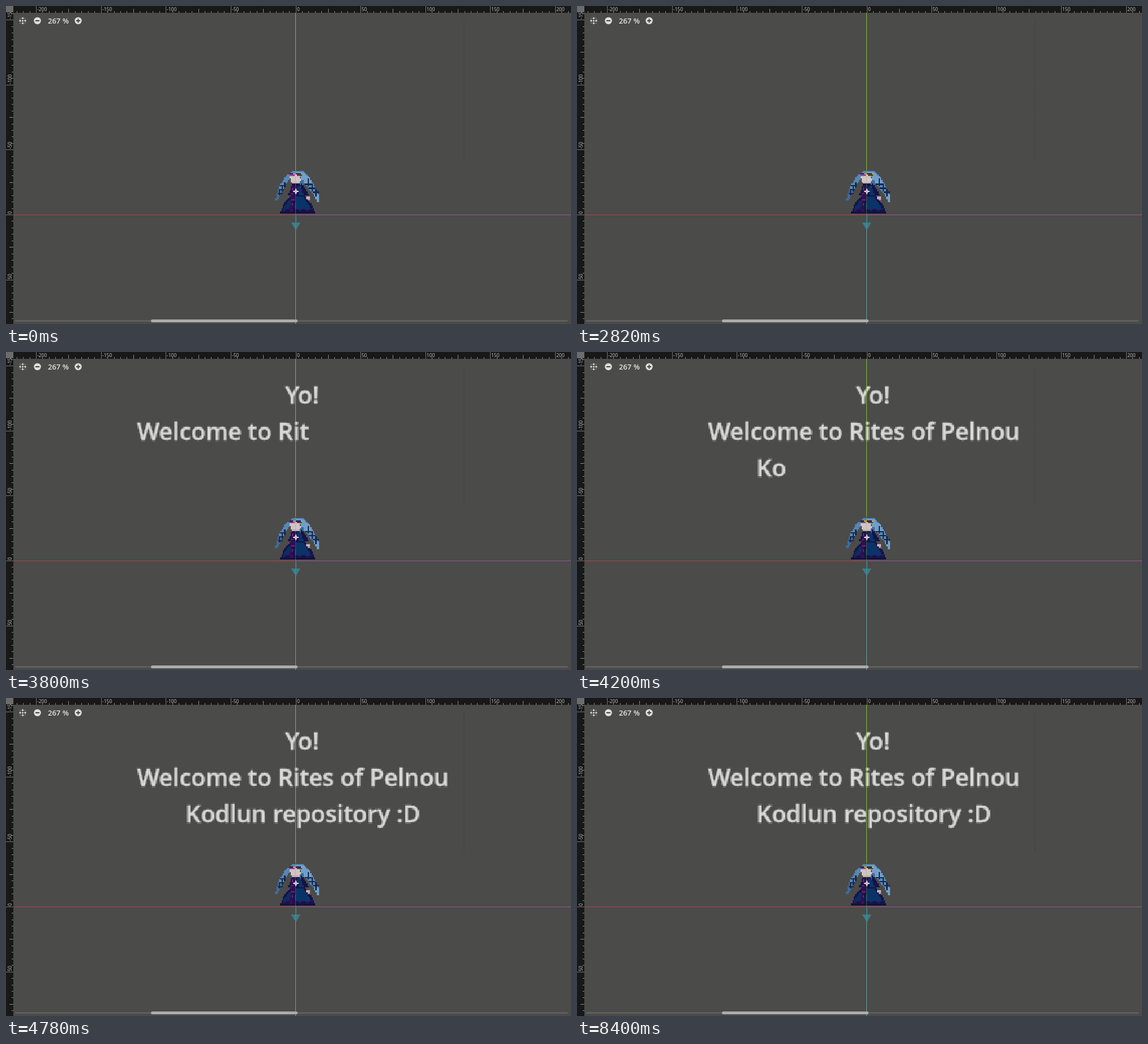
An HTML page with a canvas for the animation above (8420 ms loop, 998 by 561 pixels).

```html
<!DOCTYPE html>
<html lang="en">
<head>
<meta charset="utf-8">
<style>
  html, body { margin: 0; width: 100%; height: 100%; overflow: hidden; background: #4b4b49; }
  canvas { display: block; }
</style>
</head>
<body>
<canvas id="stage" width="998" height="561"></canvas>
<script>
const W = 998, H = 561, LOOP = 8420;
const UNIT = 2.2925, OX = 512, OY = 368.5;
const TYPE_START = 3290, TYPE_STEP = 27;
const LINES = [
  { text: 'Yo!', x: -8.3, y: -121 },
  { text: 'Welcome to Rites of Pelnou', x: -122.3, y: -93 },
  { text: 'Kodlun repository :D', x: -85, y: -65 },
];
const TYPED = LINES.reduce((sum, line) => sum + line.text.length + 1, 0);
const POSES = [
  { until: 3380, bob: 0, band: 0 },
  { until: 3780, bob: 0, band: -1 },
  { until: LOOP, bob: 1, band: 0 },
];

function layer(width, height) {
  const c = document.createElement('canvas');
  c.width = width;
  c.height = height;
  return c.getContext('2d');
}

function box(g, color, x, y, w, h) {
  g.fillStyle = color;
  g.fillRect(x, y, w, h);
}

function disc(g, color, x, y, r) {
  g.fillStyle = color;
  g.beginPath();
  g.arc(x, y, r, 0, 7);
  g.fill();
}

function poly(g, color, ...points) {
  g.fillStyle = color;
  g.beginPath();
  points.forEach(([x, y]) => g.lineTo(x, y));
  g.fill();
}

function drawBackground(g) {
  box(g, '#4b4b49', 0, 0, W, H);
  for (let y = 25; y < 270; y += 4) box(g, 'rgba(30,30,30,.25)', 808.5, y, 1, 2);
}

// Ticks every 5 units; every tenth one is labelled.
function drawRuler(g, { origin, from, to, thick, baseline, sign }) {
  g.font = "8.5px 'Open Sans', sans-serif";
  for (let n = -50; n <= 50; n++) {
    const p = Math.round(origin + n * 5 * UNIT);
    if (p < from || p > to) continue;
    const major = n % 10 === 0;
    const size = major ? thick : n % 5 === 0 ? 7 : 3;
    box(g, major ? '#777' : '#8a8a8a', p, thick - size, 1, size);
    if (major) {
      g.fillStyle = '#c8c8c8';
      g.fillText(n * 5 * sign, p + 2, baseline);
    }
  }
}

function drawRulers(g) {
  box(g, '#181818', 0, 0, W, 12);
  box(g, '#181818', 0, 0, 13, H);
  drawRuler(g, { origin: OX - 0.5, from: 13, to: W, thick: 12, baseline: 8.5, sign: 1 });
  g.save();
  g.translate(0, H);
  g.rotate(-Math.PI / 2);
  drawRuler(g, { origin: H - OY - 0.5, from: 0, to: H - 12, thick: 13, baseline: 10, sign: -1 });
  g.restore();
  box(g, '#6c6c6c', 0, 0, 13, 11);
}

function drawControls(g) {
  const pale = '#dededc', dark = '#444440';
  g.save();
  g.translate(29.5, 26);
  disc(g, pale, 0, 0, 1.5);
  for (let i = 0; i < 4; i++) {
    g.rotate(Math.PI / 2);
    poly(g, pale, [-2.5, -5], [2.5, -5], [0, -2.4]);
    box(g, pale, -0.7, -6.3, 1.4, 2);
    box(g, 'rgba(222,222,220,.6)', 3.6, 3.6, 1.3, 1.3);
  }
  g.restore();
  for (const x of [55.5, 127.5]) {
    disc(g, pale, x, 26, 6.2);
    box(g, dark, x - 3.5, 25, 7, 2);
  }
  box(g, dark, 126.5, 22.5, 2, 7);
  g.fillStyle = '#e4e4e2';
  g.font = "600 13px 'Open Sans', sans-serif";
  g.fillText('267 %', 74, 30.8);
  box(g, '#686866', 16, 554.5, 976, 2);
  g.fillStyle = '#acacaa';
  g.beginPath();
  g.roundRect(256, 553, 259, 5, 2.5);
  g.fill();
}

function drawAxes(g) {
  box(g, '#b0474a', 14, 368, OX - 14, 1);
  box(g, '#96589a', OX, 368, W - OX, 1);
  box(g, '#84b83c', 511, 12, 1, 278);
  box(g, 'rgba(132,184,60,.45)', 511, 290, 1, 78);
  box(g, '#6a9fa5', 511, 369, 1, H - 369);
  box(g, '#397f8c', 511, 369, 2, 14);
  poly(g, 'rgba(55,137,153,.8)', [503.5, 382], [520, 382], [512, 395.5]);
}

// Fills rows y0..y1 while both edges move in a straight line.
function taper(g, color, y0, y1, l0, r0, l1, r1) {
  for (let y = y0; y <= y1; y++) {
    const k = (y - y0) / Math.max(1, y1 - y0);
    const l = Math.round(l0 + (l1 - l0) * k);
    const r = Math.round(r0 + (r1 - r0) * k);
    box(g, color, l, y, r - l, 1);
  }
}

function drawHair(g) {
  const blue = '#5587b5', light = '#719fca', shade = '#3f6c9b', navy = '#15264f';
  taper(g, blue, -34, -30, -3, 6, -8, 10);
  taper(g, light, -33, -31, 0, 6, -1, 8);
  taper(g, blue, -30, -20, -8, -4, -14, -10);
  taper(g, shade, -20, -12, -14, -10, -16, -14);
  taper(g, light, -30, -25, 3, 10, 6, 13);
  taper(g, blue, -24, -17, 7, 14, 13, 17);
  taper(g, light, -16, -11, 14, 18, 16, 18);
  box(g, shade, 4, -27, 2, 4);
  for (let i = 0; i < 3; i++) {
    box(g, navy, -9 - i * 2, -25 + i * 3, 1, 4);
    box(g, navy, -12 - i, -23 + i * 3, 4, 1);
    box(g, navy, 9 + i * 3, -28 + i * 4, 1, 6);
    box(g, navy, 7 + i * 3, -24 + i * 3, 5, 1);
  }
}

function drawFace(g, band) {
  taper(g, '#d3c3c6', -31, -26, -5, 3, -4, 4);
  box(g, '#c6aeb4', -3, -25, 6, 1);
  box(g, '#28225a', -5, -32 + band, 10, 1);
  box(g, '#a23aa0', -5, -31 + band, 4, 1);
  box(g, '#b59b35', -2, -32 + band, 2, 1);
  box(g, '#594c28', 1, -31 + band, 4, 1);
  box(g, '#c9ad42', 4, -32 + band, 1, 1);
  box(g, '#207c76', 3, -26, 1, 3);
}

function drawDress(g, bob) {
  const navy = '#131349', blue = '#0a3468', plum = '#2f0f4e', magenta = '#84198a';
  taper(g, navy, -24, -16, -3, 5, -6, 10);
  taper(g, navy, -15, -10, -4, 7, -9, 11);
  taper(g, navy, -10, -2, -9, 11, -12, 15);
  taper(g, blue, -22, -16, 1, 4, 2, 6);
  taper(g, blue, -14, -5, 0, 6, -1, 12);
  taper(g, '#0e2c60', -11, -5, -6, -4, -10, -5);
  taper(g, plum, -22, -3, -3, -1, -5, -2);
  for (let x = -10; x < 14; x += 3) box(g, '#32145d', x, -4 - (x & 1), 2, 1);
  box(g, '#110d3a', -12, -2, 27, 1);
  box(g, magenta, -4, -12, 3, 1);
  box(g, magenta, -3, -21, 1, 2);
  box(g, magenta, 3, -22, 1, 1);
  box(g, '#66227d', -4, -17, 2, 1);
  box(g, '#732078', -3, -9, 1, 2);
  box(g, '#c9afb4', 8, -14 + bob, 3, 2);
  box(g, '#ac8f9b', 9, -12 + bob, 2, 1);
}

function drawSprite(g, pose) {
  g.save();
  g.translate(0, pose.bob);
  drawHair(g);
  g.restore();
  drawDress(g, pose.bob);
  g.save();
  g.translate(0, pose.bob);
  drawFace(g, pose.band);
  g.restore();
}

function drawText(g, count) {
  g.fillStyle = g.strokeStyle = '#d9d9d7';
  g.lineWidth = 0.3;
  g.font = "600 18.25px 'Open Sans', sans-serif";
  for (const { text, x, y } of LINES) {
    const typed = text.slice(0, Math.max(0, count));
    g.fillText(typed, x, y);
    g.strokeText(typed, x, y);
    count -= text.length + 1;
  }
}

function drawPivot(g) {
  box(g, '#d9d0d9', 511, 322, 2, 10);
  box(g, '#d9d0d9', 507, 326, 10, 2);
  disc(g, '#e9d8e4', 512, 327, 2.6);
  disc(g, '#b579a4', 512, 327, 1);
}

const screen = document.getElementById('stage').getContext('2d');
const back = layer(W, H), front = layer(W, H);
const world = layer(256, 152);
const WX = 128, WY = 150;
screen.imageSmoothingEnabled = false;

drawBackground(back);
drawAxes(front);
drawPivot(front);
drawRulers(front);
drawControls(front);

let shown = '';
function render() {
  const t = performance.now() % LOOP;
  const count = Math.max(0, Math.min(TYPED, Math.floor((t - TYPE_START) / TYPE_STEP)));
  const pose = POSES.find(p => t < p.until);
  const key = count + ':' + pose.until;
  if (key !== shown) {
    shown = key;
    world.setTransform(1, 0, 0, 1, 0, 0);
    world.clearRect(0, 0, 256, 152);
    world.translate(WX, WY);
    drawText(world, count);
    drawSprite(world, pose);
    screen.drawImage(back.canvas, 0, 0);
    screen.drawImage(world.canvas, OX - WX * UNIT, OY - WY * UNIT, 256 * UNIT, 152 * UNIT);
    screen.drawImage(front.canvas, 0, 0);
  }
  requestAnimationFrame(render);
}
render();
</script>
</body>
</html>
```
